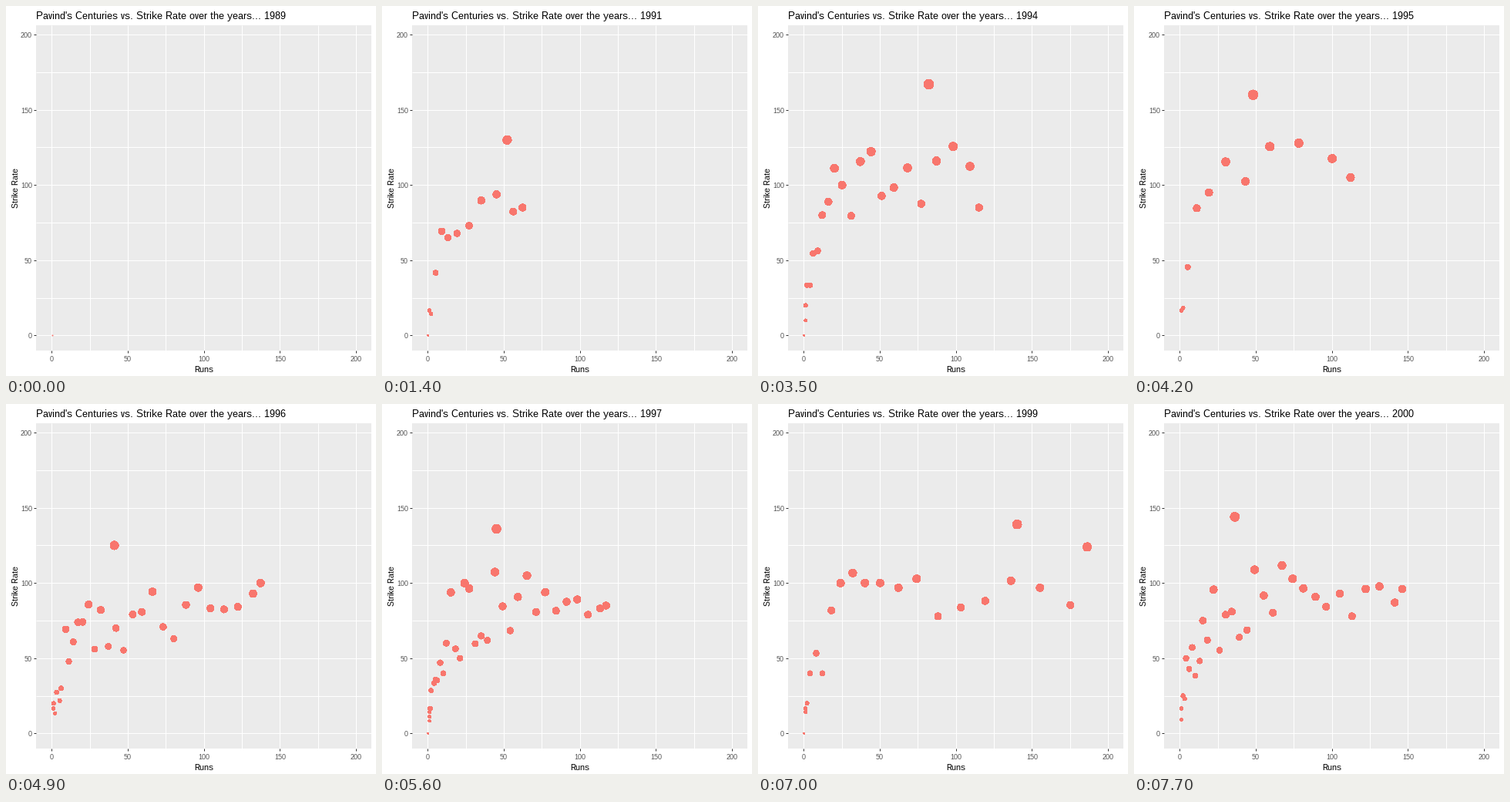
Animation, 480 px wide and 480 px high, one loop 8000 ms. Source, as a matplotlib script:

```python
import numpy as np
import matplotlib.pyplot as plt
from matplotlib.animation import FuncAnimation
from matplotlib.patches import Rectangle

SIZE, DPI = 480, 96
PT = 72 / DPI
FIRST_YEAR, STEPS_PER_YEAR, STEPS = 1989, 7, 80
LEFT, RIGHT, TOP, BOTTOM = 39, 474, 25, 447
MAX_RATE = 196.7
RED = "#F8766D"

# Year: innings, highest score and fastest innings, both as (runs, rate).
SEASONS = {
    1990: (11, (53, 129), (26, 104)),
    1991: (14, (62, 85), (52, 130)),
    1992: (19, (84, 78), (35, 115)),
    1993: (17, (82, 101), (24, 150)),
    1994: (24, (115, 85), (82, 167)),
    1995: (12, (112, 105), (48, 160)),
    1996: (32, (137, 100), (41, 125)),
    1997: (35, (117, 85), (45, 136)),
    1998: (33, (143, 109), (41, 158)),
    1999: (22, (186, 124), (140, 139)),
    2000: (34, (146, 96), (36, 144)),
}
DUCK_YEARS = {1989, 1990, 1991, 1994, 1997, 1999}

plt.rcParams.update({
    "font.family": "Liberation Sans",
    "text.hinting": "native",
    "text.hinting_factor": 1,
})


def px(runs):
    return 59.2 + 1.975 * runs


def py(rate):
    return 427.35 - 1.951 * rate


def innings(year):
    """Many low scores, few high ones; the rate levels off as runs grow."""
    duck = [(0, 0)] if year in DUCK_YEARS else []
    if year not in SEASONS:
        return np.array(duck, float)
    count, best, fastest = SEASONS[year]
    rng = np.random.default_rng(year)
    n = count - len(duck) - 2
    u = (np.arange(n) + 0.5) / n
    runs = np.maximum(1, np.round(best[0] * u ** 2.2))
    settled = 1 - np.exp(-(runs + 1) / 10)
    noise = rng.uniform(-1, 1, n) * 0.5 * (1 - 0.6 * u)
    rate = np.clip(0.65 * fastest[1] * settled * (1 + noise), 8, fastest[1])
    balls = np.ceil(100 * runs / rate)
    return np.vstack([*duck, best, fastest,
                      np.column_stack([runs, 100 * runs / balls])])


points = {y: innings(y) for y in range(FIRST_YEAR, 2001)}

fig = plt.figure(figsize=(SIZE / DPI, SIZE / DPI), dpi=DPI, facecolor="white")
ax = fig.add_axes([0, 0, 1, 1])
ax.set_xlim(0, SIZE)
ax.set_ylim(SIZE, 0)
ax.axis("off")


def line(xs, ys, color):
    ax.plot(xs, ys, color=color, lw=PT, solid_capstyle="butt", zorder=1)


def label(x, y, s, size, color="black", ha="center", **kw):
    return ax.text(x, y, s, fontsize=size * PT, color=color, ha=ha,
                   va="baseline", rotation_mode="anchor", **kw)


ax.add_patch(Rectangle((LEFT, TOP), RIGHT - LEFT, BOTTOM - TOP,
                       fc="#EBEBEB", lw=0, zorder=0))

for v in range(0, 201, 25):
    x, y = px(v), py(v)
    line([x, x], [TOP, BOTTOM], "white")
    line([LEFT, RIGHT], [y, y], "white")
    if v % 50 == 0:
        line([x, x], [BOTTOM, BOTTOM + 3], "#333333")
        line([LEFT - 3, LEFT], [y, y], "#333333")
        label(x, 461, str(v), 9, "#4D4D4D")
        label(34, y + 4, str(v), 9, "#4D4D4D", ha="right")

label(256.5, 475, "Runs", 11)
label(16, 236, "Strike Rate", 11, rotation=90)
title = label(LEFT, 17, "", 13, ha="left")
dots = ax.scatter([], [], c=RED, linewidths=0, antialiaseds=False, zorder=2)


def draw(i):
    year = FIRST_YEAR + i // STEPS_PER_YEAR
    runs, rate = points[year].T
    # Dot area grows with the strike rate.
    radius = np.maximum(1, 0.45 + 6.4 * np.sqrt(rate / MAX_RATE))
    dots.set_offsets(np.column_stack([px(runs) + 0.5, py(rate)]))
    dots.set_sizes((2 * radius * PT) ** 2)
    title.set_text(f"Pavind's Centuries vs. Strike Rate over the years... {year}")
    return dots, title


anim = FuncAnimation(fig, draw, frames=STEPS, interval=100, repeat=True,
                     repeat_delay=0, blit=False)
plt.show()
```
